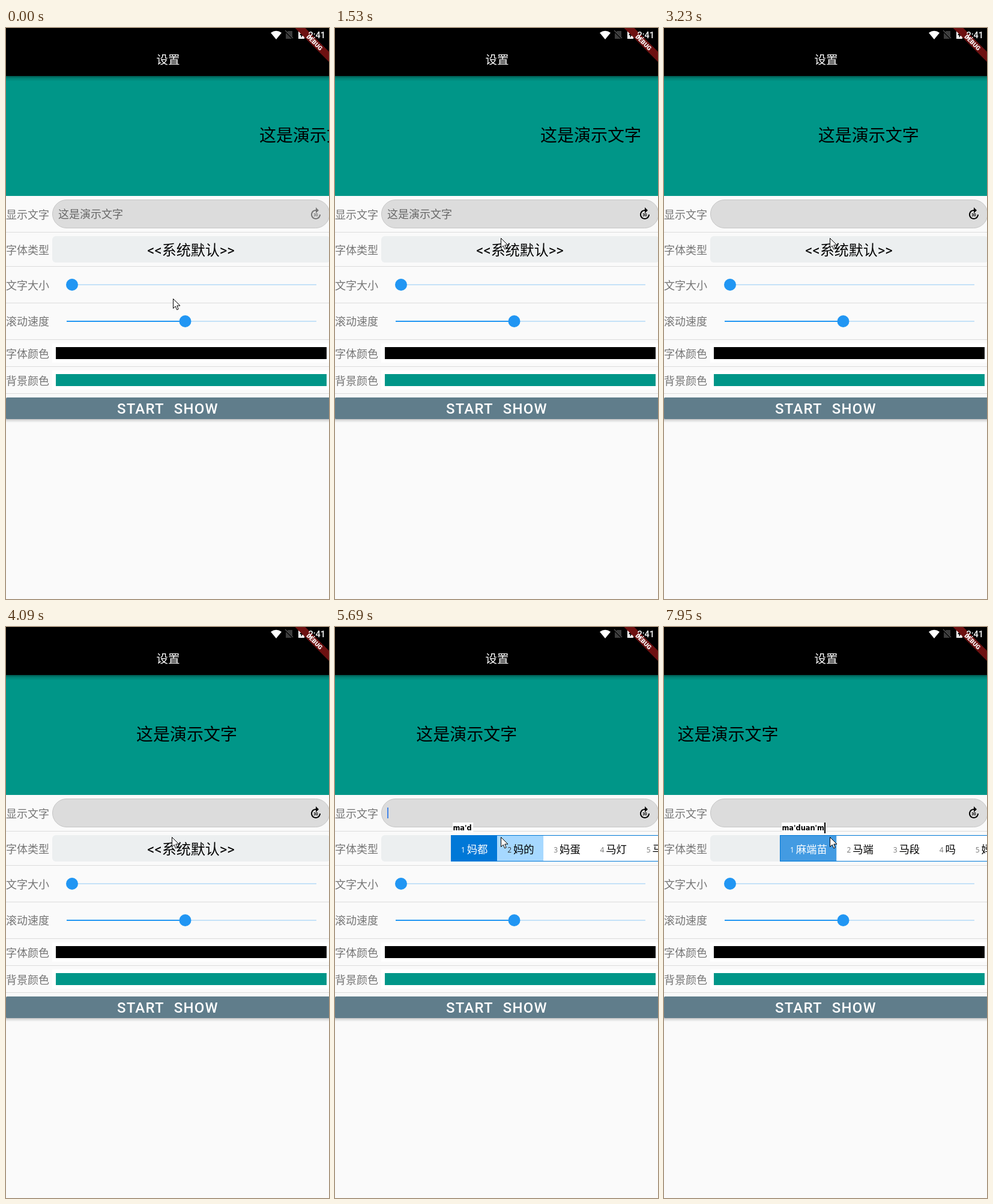
An HTML page that plays this animation: 538 by 952 pixels, repeating every 8 s.

```html
<!DOCTYPE html>
<html lang="zh-CN">
<head>
<meta charset="utf-8">
<title>设置</title>
<style>
  html, body { margin: 0; width: 100%; height: 100%; overflow: hidden; background: #fafafa; }
  svg { display: block; }
  text { font-family: Roboto, 'Noto Sans CJK SC', 'Noto Sans CJK', sans-serif; white-space: pre; }
  .label { font-size: 18px; fill: #757575; }
  .line { fill: #dcdcdc; }
  .word { font: 500 24px Roboto, sans-serif; letter-spacing: 1.25px; fill: #fff; }
  .cand { font: 17.33px 'Noto Sans CJK SC', 'Noto Sans CJK', sans-serif; }
  .num { font: 12px 'Open Sans', 'Noto Sans', sans-serif; }
  #preText { font: bold 11.4px 'DejaVu Sans', sans-serif; }
</style>
</head>
<body>
<svg width="538" height="952" viewBox="0 0 538 952">
  <defs>
    <linearGradient id="shade" x2="0" y2="1">
      <stop offset="0" stop-color="#000" stop-opacity=".42"/>
      <stop offset=".4" stop-color="#000" stop-opacity=".15"/>
      <stop offset="1" stop-color="#000" stop-opacity="0"/>
    </linearGradient>
  </defs>
  <rect width="538" height="952" fill="#fafafa"/>

  <!-- Preview -->
  <rect y="80" width="538" height="200" fill="#009688"/>
  <rect y="80" width="538" height="9" fill="url(#shade)"/>
  <text id="marquee" y="189" font-size="28">这是演示文字</text>

  <!-- App bar -->
  <rect width="538" height="80"/>
  <text x="270" y="60.3" font-size="19.5" font-weight="500" fill="#fff" text-anchor="middle">设置</text>
  <path d="M441 8Q450 1.500 459 8L450 19Z" fill="#fff"/>
  <path d="M470 5H477V18H466V9Z" fill="#3c3c3c"/>
  <path d="M465 5L478 18" stroke="#000" stroke-width="2.500"/>
  <path d="M465 4L478 17" stroke="#555" stroke-width="1.200"/>
  <path d="M487 4.500H490V3H494V4.500H497V18H487Z" fill="#fff"/>
  <path d="M493 6L489 12H491.500V16.500L495.500 10H493Z"/>
  <g transform="translate(538) rotate(45)">
    <rect x="-40" y="28" width="80" height="12" fill="#6d1111"/>
    <text y="37.700" font-size="10.2" font-weight="900" fill="#fff" text-anchor="middle">DEBUG</text>
  </g>
  <text x="503.500" y="17" font-size="14.5" font-weight="500" fill="#fff">2:41</text>

  <g id="rows"></g>

  <!-- Text field -->
  <rect x="77.500" y="286.500" width="461.500" height="47" rx="23.500" fill="#dcdcdc" stroke="#c6c6c6"/>
  <text id="field" x="87" y="316.500" font-size="18" fill="#666"></text>
  <rect id="caret" x="87" y="301" width="2" height="18" fill="#4285e8"/>
  <g id="redo" transform="translate(504 298)">
    <path d="M18 13c0 3.310-2.690 6-6 6s-6-2.690-6-6 2.690-6 6-6v4l5-5-5-5v4c-4.420 0-8 3.580-8 8s3.580 8 8 8 8-3.580 8-8h-2z"/>
    <text x="12" y="15.500" font-size="6.5" font-weight="700" text-anchor="middle">30</text>
  </g>

  <!-- Font picker -->
  <rect x="77" y="347" width="463" height="44" rx="6" fill="#eceff0"/>
  <text x="308" y="379" font-size="24" text-anchor="middle">&lt;&lt;系统默认&gt;&gt;</text>

  <!-- Sliders -->
  <g fill="#2196f3">
    <rect x="101" y="427" width="416" height="2" fill="#c5e2f8"/>
    <circle cx="110" cy="428" r="10"/>
    <rect x="101" y="488" width="416" height="2" fill="#c5e2f8"/>
    <rect x="101" y="488" width="198" height="2"/>
    <circle cx="298.500" cy="489" r="10"/>
  </g>

  <!-- Colours -->
  <path d="M77 526H538V558H77ZM77 571H538V603H77Z" fill="#fff"/>
  <rect x="83" y="532" width="451" height="20"/>
  <rect x="83" y="577" width="451" height="20" fill="#009688"/>

  <!-- Button -->
  <rect y="650" width="538" height="8" fill="url(#shade)"/>
  <rect y="616" width="540" height="36" rx="2" fill="#607d8b"/>
  <text class="word" x="185" y="642.500">START</text>
  <text class="word" x="279.700" y="642.500">SHOW</text>

  <!-- Input method -->
  <g id="ime">
    <g id="bar"></g>
    <rect id="preBox" x="196" y="326" height="17" fill="#fff"/>
    <text id="preText" x="196.500" y="339"></text>
    <rect id="preCaret" y="326" width="2" height="18"/>
  </g>

  <path id="mouse" d="M.5.5V16.500L4.200 13L6.700 18.800L9.200 17.700L6.800 12H12Z" fill="#fff" stroke="#000"/>
</svg>
<script>
const $ = id => document.getElementById(id);
const LOOP = 8000, FOCUS = 600, ERASE = 1900, ERASE_STEP = 105;
const MESSAGE = '这是演示文字';
const EMPTY = ERASE + ERASE_STEP * (MESSAGE.length - 1);

// [time, equal steps until the next time]
const pace = [[0,1],[70,11],[850,1],[910,8],[1530,2],[1680,1],[1760,7],[2310,3],[2540,1],
  [2620,10],[3380,1],[3460,8],[4090,2],[4230,1],[4320,10],[5070,1],[5150,7],[5690,3],
  [5920,1],[6000,10],[6770,1],[6850,2],[7040,8],[7640,1],[7720,3],[7950,1],[LOOP,1]];
const scroll = [[0,423],[1530,343],[2310,304.5],[3380,250],[4090,218],[5690,136.3],
  [6770,83.5],[7040,70.5],[7640,39],[7950,23.5]];
const mouseX = [[70,278],[520,181],[660,181],[850,200],[1400,276]];
const mouseY = [[70,451],[520,312],[660,312],[850,316],[1400,350]];

// [start, typed, candidates]
const typing = [
  [4650, 'm', '吗 妈 嘛 马 们 没'],
  [4820, 'ma', '吗 妈 马 嘛 麻 骂'],
  [5150, "ma'd", '妈都 妈的 妈蛋 马灯 马达'],
  [6240, 'ma', '吗 妈 马 嘛 麻 骂'],
  [6480, "ma'd", '妈都 马刀 麻袋 马达 MD'],
  [7160, "ma'du", '妈都 马肚 吗 妈 马'],
  [7320, "ma'duan", '麻端苗 马端 马段 吗 妈'],
  [7760, "ma'duan'm", '麻端苗 马端 马段 吗 妈'],
];

$('rows').innerHTML = [
  ['显示文字', 311, 340], ['字体类型', 370, 397], ['文字大小', 429, 458],
  ['滚动速度', 489, 519], ['字体颜色', 543, 564], ['背景颜色', 588, 609],
].map(([name, mid, line]) =>
  `<text class="label" y="${mid + 6.6}">${name}</text>
   <rect class="line" y="${line}" width="538" height="1"/>`).join('');

function lerpAt(points, t) {
  if (t <= points[0][0]) return points[0][1];
  for (let i = 1; i < points.length; i++) {
    const [t0, a] = points[i - 1], [t1, b] = points[i];
    if (t <= t1) return a + (b - a) * (t - t0) / (t1 - t0);
  }
  return points.at(-1)[1];
}

function stepTime(t) {
  const i = pace.findLastIndex(p => p[0] <= t);
  const [start, count] = pace[i];
  const size = (pace[i + 1][0] - start) / count;
  return start + Math.floor((t - start) / size + 1e-6) * size;
}

const show = (id, on) => $(id).setAttribute('visibility', on ? 'inherit' : 'hidden');

function candidateBar(words) {
  let x = 193, out = '<rect x="193" y="347" width="350" height="44" fill="#fff"/>';
  words.split(' ').forEach((word, i) => {
    const width = 42.5 + 17.33 * word.length;
    const hover = x < 277 && x + width > 277;
    const fill = i ? (hover ? '#a6d8ff' : '#fff') : (hover ? '#439be2' : '#0078d7');
    out += `<rect x="${x}" y="347" width="${width}" height="44" fill="${fill}"/>
      <text class="num" x="${x + 17}" y="375.500" fill="${i ? (hover ? '#333' : '#777') : '#fff'}">${i + 1}</text>
      <text class="cand" x="${x + 26.8}" y="376.500" fill="${i ? '#000' : '#fff'}">${word}</text>`;
    x += width;
  });
  return out + '<rect x="193.500" y="347.500" width="350" height="43" fill="none" stroke="#0078d7"/>';
}

let stage = -2, preWidth = 0;
function drawIme(t) {
  const next = typing.findLastIndex(s => s[0] <= t);
  if (next !== stage) {
    stage = next;
    show('ime', stage >= 0);
    if (stage >= 0) {
      const [, typed, words] = typing[stage];
      $('bar').innerHTML = candidateBar(words);
      $('preText').textContent = typed;
      preWidth = $('preText').getComputedTextLength();
      $('preBox').setAttribute('width', preWidth + 3);
      $('preCaret').setAttribute('x', Math.round(196.5 + preWidth));
    }
  }
  show('preCaret', stage >= 0 && (t - typing[stage][0]) % 1060 < 530);
}

function drawField(t) {
  const erased = t < ERASE ? 0 : Math.floor((t - ERASE) / ERASE_STEP) + 1;
  const length = Math.max(0, MESSAGE.length - erased);
  const base = t < ERASE ? FOCUS : t < EMPTY ? t : EMPTY;
  $('field').textContent = MESSAGE.slice(0, length);
  const caret = $('caret'), tall = length > 0;
  caret.setAttribute('x', 87 + 18 * length);
  caret.setAttribute('y', tall ? 297 : 301);
  caret.setAttribute('height', tall ? 23 : 18);
  show('caret', t >= FOCUS && Math.floor((t - base) / 500) % 2 === 0);
  $('redo').setAttribute('fill', t < FOCUS ? '#747474' : '#000');
}

function draw(now) {
  const t = stepTime(now % LOOP);
  $('marquee').setAttribute('x', lerpAt(scroll, t) - 1);
  $('mouse').setAttribute('transform',
    `translate(${Math.round(lerpAt(mouseX, t))} ${Math.round(lerpAt(mouseY, t))})`);
  drawField(t);
  drawIme(t);
}

const origin = performance.now();
function tick() {
  draw(performance.now() - origin);
  requestAnimationFrame(tick);
}
tick();
</script>
</body>
</html>
```
